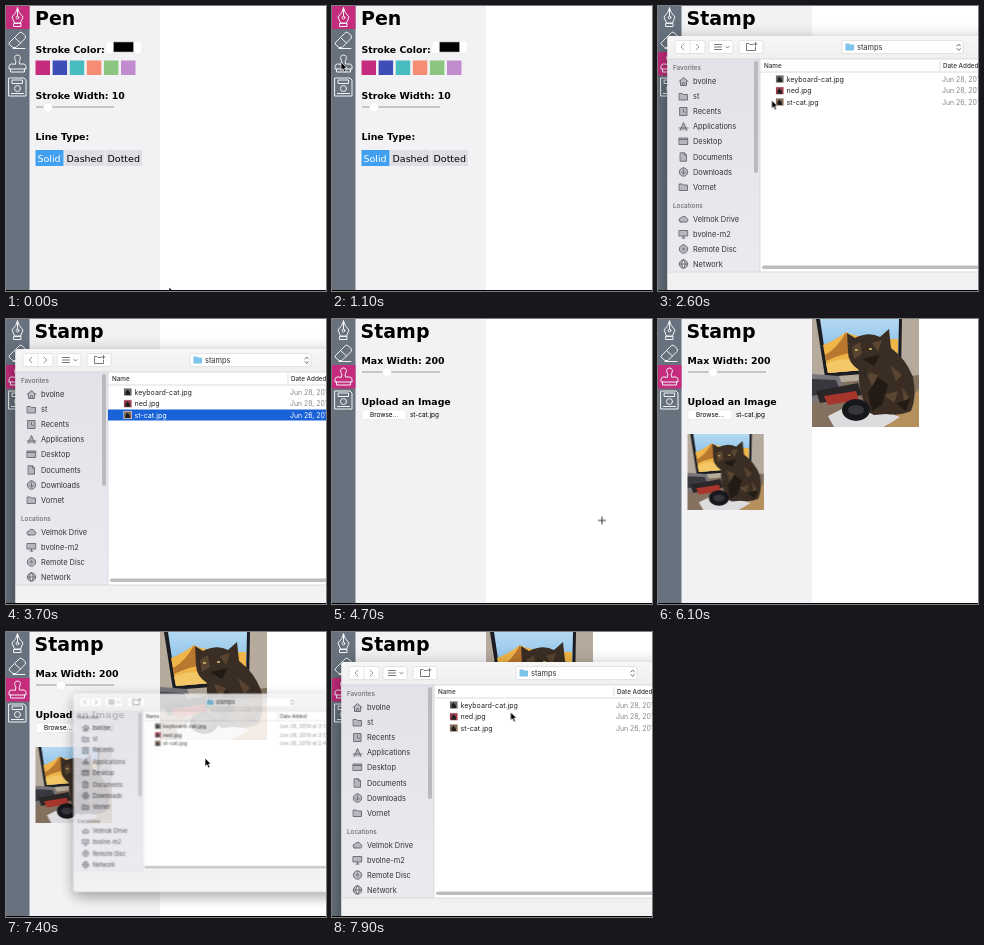
Recreate the animation shown at these times as an HTML page. Size 320 px wide and 285 px high, loop 8 s.

```html
<!DOCTYPE html>
<html lang="en">
<head>
<meta charset="utf-8">
<title>Stamp tool</title>
<style>
html, body { margin: 0; width: 100%; height: 100%; overflow: hidden; background: #fff; }
svg { display: block; }
#stage { width: 320px; height: 285px; }
text { font-family: Inter, "Liberation Sans", sans-serif; white-space: pre; }
.title, .label { font-family: "DejaVu Sans", sans-serif; font-weight: bold; fill: #000; }
.title { font-size: 19px; }
.label { font-size: 9.4px; }
.choice { font-family: "DejaVu Sans", sans-serif; font-size: 9.5px; }
.small { font-size: 6.4px; }
.head { font-size: 6.3px; font-weight: 500; fill: #333; }
.group { font-size: 6.3px; font-weight: 600; fill: #77787d; }
.side { font-size: 7.4px; fill: #333337; }
.file { font-size: 7.1px; fill: #222; }
.date { font-size: 6.9px; fill: #85858a; }
.tool { fill: none; stroke: #f2f3f4; stroke-width: 1; stroke-linejoin: round; stroke-linecap: round; }
.line { fill: none; stroke: #66686d; stroke-width: .9; stroke-linejoin: round; stroke-linecap: round; }
#places .line { fill: rgba(90, 92, 102, .35); }
.btn { fill: #fff; stroke: #d4d4d6; stroke-width: .6; }

.cut { animation: 8s step-end infinite; }
.pen { animation-name: pen; }
.stamp { animation-name: stamp; }
.press { animation-name: press; }
.empty { animation-name: empty; }
.chosen { animation-name: chosen; }
.preview { animation-name: preview; }
.print { animation-name: print; }
.select { animation-name: select; }
.arrow { animation-name: arrow; }
.cross { animation-name: cross; }
#dialog { transform-origin: 242px 157px; animation: dialog 8s linear infinite; }
#sheet { filter: drop-shadow(0 6px 9px rgba(0, 0, 0, .45)); }
#cursor { animation: cursor 8s ease-in-out infinite; }

@keyframes pen { 0% { opacity: 1 } 16.25%, 100% { opacity: 0 } }
@keyframes stamp { 0% { opacity: 0 } 16.25%, 100% { opacity: 1 } }
@keyframes press { 0%, 27.5%, 88.5%, 100% { opacity: 0 } 25%, 87.25% { opacity: 1 } }
@keyframes empty { 0% { opacity: 1 } 57%, 100% { opacity: 0 } }
@keyframes chosen { 0% { opacity: 0 } 57%, 100% { opacity: 1 } }
@keyframes preview { 0% { opacity: 0 } 60%, 100% { opacity: 1 } }
@keyframes print { 0% { opacity: 0 } 71.25%, 100% { opacity: 1 } }
@keyframes select { 0%, 60%, 100% { opacity: 0 } 37.5% { opacity: 1 } }
@keyframes arrow { 0%, 82.1%, 100% { opacity: 1 } 57% { opacity: 0 } }
@keyframes cross { 0%, 82.1%, 100% { opacity: 0 } 57% { opacity: 1 } }
@keyframes dialog {
  0%, 28.6%, 91.1% { opacity: 0; transform: scale(.6) }
  30%, 30.4%, 92.5%, 92.9% { opacity: .84; transform: scale(.75) }
  32.5%, 57%, 95%, 100% { opacity: 1; transform: none }
  58.6% { opacity: 0; transform: scale(.85) }
}
@keyframes cursor {
  0%, 1% { transform: translate(163px, 281px) }
  11.25%, 17.5% { transform: translate(9px, 56px) }
  23.75%, 29% { transform: translate(47.5px, 92.5px) }
  35%, 41% { transform: translate(150px, 95px); animation-timing-function: ease-in }
  45% { transform: translate(211px, 126px); animation-timing-function: linear }
  46.25%, 57% { transform: translate(335px, 175px) }
  58.6%, 60% { transform: translate(270px, 201.5px) }
  68.75%, 80% { transform: translate(207.5px, 54px) }
  85.5%, 89% { transform: translate(47.5px, 92.5px) }
  92.4%, 93% { transform: translate(199px, 126px) }
  98%, 100% { transform: translate(178.5px, 80px) }
}
</style>
</head>
<body>
<svg id="stage" viewBox="0 0 320 285">
  <defs>
    <linearGradient id="blue" x2="0" y2="1">
      <stop stop-color="#6fb0f8"/><stop offset="1" stop-color="#1662ea"/>
    </linearGradient>
    <linearGradient id="bar" x2="0" y2="1">
      <stop stop-color="#f7f7f7"/><stop offset="1" stop-color="#efeff0"/>
    </linearGradient>
    <linearGradient id="side" x2="0" y2="1">
      <stop stop-color="#e2e2e9"/><stop offset="1" stop-color="#ebeaf0"/>
    </linearGradient>
    <linearGradient id="sky" x2="0" y2="1">
      <stop stop-color="#b4d9f2"/><stop offset="1" stop-color="#6fb0e4"/>
    </linearGradient>
    <symbol id="photo" viewBox="0 0 107 108" preserveAspectRatio="none">
      <path fill="#b5aa9c" d="M0 0H107V108H0Z"/>
      <path fill="#83705f" d="M0 66L107 56V108H0Z"/>
      <path fill="#b58f5c" d="M74 108L107 70V108Z"/>
      <path fill="#1c1d22" d="M4 0H90L89 52L13 58Z"/>
      <path fill="url(#sky)" d="M8 0H87L86 48L16 54Z"/>
      <path fill="#efb548" d="M11 26Q22 22 34 13Q46 20 86 20V48L16 54Z"/>
      <path fill="#b9772f" d="M13 36Q26 29 34 13Q37 26 46 33Q30 34 14 42Z"/>
      <path fill="#f3c765" d="M14 45Q32 36 50 44L86 42V48L16 54Z"/>
      <path fill="#77757a" d="M0 55L27 57L34 75L0 83Z"/>
      <path fill="#38383e" d="M0 60L24 61L28 71L0 77Z"/>
      <path fill="#dcdbdd" d="M16 97L46 82L88 98L72 108H22Z"/>
      <path fill="#2a2526" d="M4 72L46 64L50 76L8 84Z"/>
      <path fill="#a8352c" d="M12 77L44 72L47 81L16 86Z"/>
      <path fill="#3a2e24" d="M35 14L43 19Q57 12 68 18L77 10L79 29Q94 40 101 58Q105 78 99 92Q88 97 74 95L62 96Q52 92 51 80Q46 66 47 51Q36 44 36 33Z"/>
      <path fill="#594531" d="M40 28L48 23L50 35L42 40ZM60 24L70 21L66 33ZM54 52L66 56L60 68ZM78 46L90 56L84 62ZM72 76L86 72L82 84ZM90 68L97 78L92 84Z"/>
      <path fill="#211a15" d="M66 58L76 66L70 86L60 92L56 74ZM84 84L98 80L94 92ZM50 40L68 36L62 47Z"/>
      <path fill="#b3a25a" d="M43 30h3v2h-3ZM57 29h3v2h-3Z"/>
      <ellipse cx="44" cy="91" rx="11" ry="8" fill="#35353b" stroke="#17181b" stroke-width="6"/>
    </symbol>
    <clipPath id="canvas"><path d="M154 0H320V284H154Z"/></clipPath>
  </defs>

  <path fill="#fff" d="M0 0H320V285H0Z"/>
  <path fill="#f2f2f4" d="M23 0H154V285H23Z"/>
  <path fill="#67727e" d="M0 0H23.5V285H0Z"/>
  <path class="cut pen" fill="#c62c7d" d="M0 0H23.5V23H0Z"/>
  <path class="cut stamp" fill="#c62c7d" d="M0 46H23.5V69.5H0Z"/>
  <g class="tool">
    <path d="M11.5 2Q12.5 7 17 11L14.5 17H8.5L6 11Q10.5 7 11.5 2ZV10M8 17.5H15V20.5H8Z"/>
    <circle cx="11.5" cy="11.5" r="1.4"/>
    <path d="M3.5 36.5L13.5 26.5Q15 25.5 16.5 27L19 29.5Q20 31 19 32.5L10 41.5H7L3.5 38.5ZM8.5 31.5L14.5 37M7 42.5H19"/>
    <path d="M9.5 58Q10.5 55.5 9 53.5Q7.5 49.5 11.5 49Q15.5 49.5 14 53.5Q12.5 55.5 13.5 58H18Q20 58.5 20 60.5V63H3V60.5Q3 58.5 5 58ZM4.5 63V66H18.5V63"/>
    <path d="M3 72H18L20 74V90H3ZM6.500 74H16.5V77.500H6.500ZM5.500 87.500H17.500"/>
    <circle cx="11.5" cy="82.500" r="3"/>
  </g>

  <g class="cut pen">
    <text class="title" x="29" y="19">Pen</text>
    <text class="label" x="29.5" y="46.5">Stroke Color:</text>
    <rect class="btn" x="100" y="35.5" width="35.5" height="12" rx="2" stroke-opacity=".4"/>
    <path stroke="#aaa" stroke-width=".6" d="M107.5 36H127.5V46H107.5Z"/>
    <g id="swatches"></g>
    <text class="label" x="29.5" y="93">Stroke Width: 10</text>
    <path fill="#b7b7ba" d="M30 100.3H108V101.7H30Z"/>
    <circle class="btn" cx="42" cy="101.5" r="4.5" stroke-opacity=".5"/>
    <text class="label" x="29.5" y="134">Line Type:</text>
    <path fill="#42a0f0" d="M29.5 144H57.5V160H29.5Z"/>
    <path fill="#dfdfe3" d="M58.5 144H98.5V160H58.5ZM99.5 144H136V160H99.5Z"/>
    <text class="choice" x="31.5" y="155.5" fill="#fff">Solid</text>
    <text class="choice" x="60.5" y="155.5">Dashed</text>
    <text class="choice" x="101.5" y="155.5">Dotted</text>
  </g>

  <g class="cut stamp">
    <text class="title" x="28.5" y="19">Stamp</text>
    <text class="label" x="29.5" y="44.5">Max Width: 200</text>
    <path fill="#b7b7ba" d="M30 52.3H108V53.7H30Z"/>
    <circle class="btn" cx="55" cy="53.5" r="4.5" stroke-opacity=".5"/>
    <text class="label" x="29.5" y="86">Upload an Image</text>
    <rect class="btn" x="30" y="91" width="44" height="9.5" rx="2" stroke-opacity=".6"/>
    <rect class="cut press" x="30" y="91" width="44" height="9.5" rx="2" fill="url(#blue)"/>
    <text class="small" x="38" y="98">Browse...</text>
    <text class="small cut empty" x="78" y="98">No file selected.</text>
    <text class="small cut chosen" x="78" y="98">st-cat.jpg</text>
    <use class="cut preview" href="#photo" x="29.5" y="115" width="76.5" height="76"/>
  </g>
  <g clip-path="url(#canvas)">
    <use class="cut print" href="#photo" x="154" width="107" height="108"/>
  </g>

  <g id="dialog">
    <rect id="sheet" x="9.5" y="30" width="465.5" height="264" rx="3" fill="#fff"/>
    <path fill="url(#bar)" d="M9.5 53V33Q9.5 30 12.5 30H472Q475 30 475 33V53Z"/>
    <path fill="url(#side)" d="M9.5 53H102V266H9.5Z"/>
    <path fill="#f1f1f2" d="M9.5 266H475V291Q475 294 472 294H12.5Q9.5 294 9.5 291Z"/>
    <path fill="none" stroke="#cfcfd2" stroke-width=".7" d="M9.5 53H475M9.5 266H475M102 53V266M102 66H475M282 55V65"/>
    <rect x="96" y="55" width="4" height="112" rx="2" fill="#b9babd"/>
    <rect x="104" y="259.5" width="300" height="3.5" rx="1.7" fill="#bcbcbe"/>
    <g class="btn">
      <rect x="17" y="34.5" width="30" height="13" rx="2"/>
      <path d="M32 34.5V47.5"/>
      <rect x="51" y="34.5" width="24" height="13" rx="2"/>
      <rect x="81" y="34.5" width="24" height="13" rx="2"/>
      <rect x="184" y="34.5" width="121" height="13" rx="2"/>
    </g>
    <g class="line">
      <path stroke="#8d8d90" d="M26 38L23 41L26 44M38 38L41 41L38 44"/>
      <path d="M56.5 38.5H63.5M56.5 41H63.5M56.5 43.5H63.5M68 40.5L69.5 42L71 40.5M95 38.500H92L91 37.500H88.500V44.500H97.500V41M97.500 36.500V39.500M96 38H99"/>
      <path d="M299 40L300.7 38L302.4 40M299 42.5L300.7 44.5L302.4 42.5"/>
    </g>
    <path fill="#7cc4ea" d="M187.5 37.5H191L192 38.5H196V44.5H187.5Z"/>
    <text class="side" x="199" y="43.7">stamps</text>
    <text class="head" x="106" y="62.3">Name</text>
    <text class="head" x="285" y="62.3">Date Added</text>
    <g id="places"></g>
    <g id="files"></g>
    <g class="cut select">
      <path fill="#1962d8" d="M102 90.5H475V101.5H102Z"/>
      <g id="picked"></g>
    </g>
  </g>

  <g id="cursor">
    <path class="cut arrow" stroke="#fff" stroke-width=".7" d="M0 0V8.5L2 6.7L3.4 10L5 9.3L3.6 6.1H6.2Z"/>
    <path class="cut cross" fill="none" stroke="#222" stroke-width=".9" d="M-4 0H4M0 -4V4"/>
  </g>
  <path d="M0 284H320V285H0Z"/>
</svg>
<script>
const fill = (id, list, draw) =>
  document.getElementById(id).innerHTML = list.map(draw).join('');

const folder = 'M1 2H4L5 3H9V8.5H1Z';
const ring = 'M5 .8A4.2 4.2 0 1 1 4.99 .8';
const places = [
  [62, 'Favorites'],
  [75.5, 'bvolne', 'M.5 5L5 1L9.5 5M2 4.5V9H8V4.5M4.2 9V6H5.8V9'],
  [90.5, 'st', folder],
  [105.5, 'Recents', 'M1.5 1H8.5V9H1.5ZM5 3V5.5H7'],
  [120.5, 'Applications', 'M1.5 9L5 1L8.5 9M.5 6.5H9.5'],
  [135.5, 'Desktop', 'M.8 1.5H9.2V8H.8ZM1 3H9'],
  [151, 'Documents', 'M2 .8H6L8 3V9.2H2ZM6 1V3H8'],
  [166, 'Downloads', ring + 'M5 3V7M3.3 5.3L5 7L6.7 5.3'],
  [181, 'Vornet', folder],
  [199.5, 'Locations'],
  [213, 'Velmok Drive', 'M2.5 8H8A2 2 0 0 0 8 4.2A3 3 0 0 0 2.5 4A2 2 0 0 0 2.5 8Z'],
  [228, 'bvolne-m2', 'M.8 1.5H9.2V7H.8ZM3.5 9H6.5M5 7V9'],
  [243, 'Remote Disc', ring + 'M5 4A1 1 0 1 1 4.99 4'],
  [258, 'Network', ring + 'M.8 5H9.2M5 .8Q1.5 5 5 9.2Q8.5 5 5 .8']
];
const files = [
  [73, 'keyboard-cat.jpg', 'Jun 28, 2019 at 3:12 PM', '#6d6a66'],
  [84.7, 'ned.jpg', 'Jun 28, 2019 at 3:12 PM', '#a33f4c'],
  [96, 'st-cat.jpg', 'Jun 26, 2019 at 2:40 PM', '#8a6f58']
];

const place = ([y, name, icon]) => icon
  ? `<path class="line" transform="translate(20.5 ${y - 5})" d="${icon}"/>
     <text class="side" x="35" y="${y + 2.7}">${name}</text>`
  : `<text class="group" x="15" y="${y + 2.2}">${name}</text>`;

const row = style => ([y, name, date, tone]) => `
  <path fill="#e8e8ea" d="M117.5 ${y - 4}h8.5v8h-8.5z"/>
  <path fill="${tone}" d="M118 ${y - 3.5}h7.5v7h-7.5z"/>
  <path fill="#1f1f22" d="M119.5 ${y + 3}v-3l2-2.5 2.5 3v2.5z"/>
  <text class="file" x="128.5" y="${y + 2.5}" ${style}>${name}</text>
  <text class="date" x="284" y="${y + 2.5}" ${style}>${date}</text>`;

fill('places', places, place);
fill('files', files, row(''));
fill('picked', files.slice(2), row('style="fill:#fff"'));
fill('swatches', ['#c62c7d', '#3f4db8', '#47bdbf', '#f78c74', '#8cc57f', '#c18ccd'],
  (color, i) => `<rect x="${29.5 + 17.1 * i}" y="54.5" width="14.5" height="14.5" fill="${color}"/>`);
</script>
</body>
</html>
```
